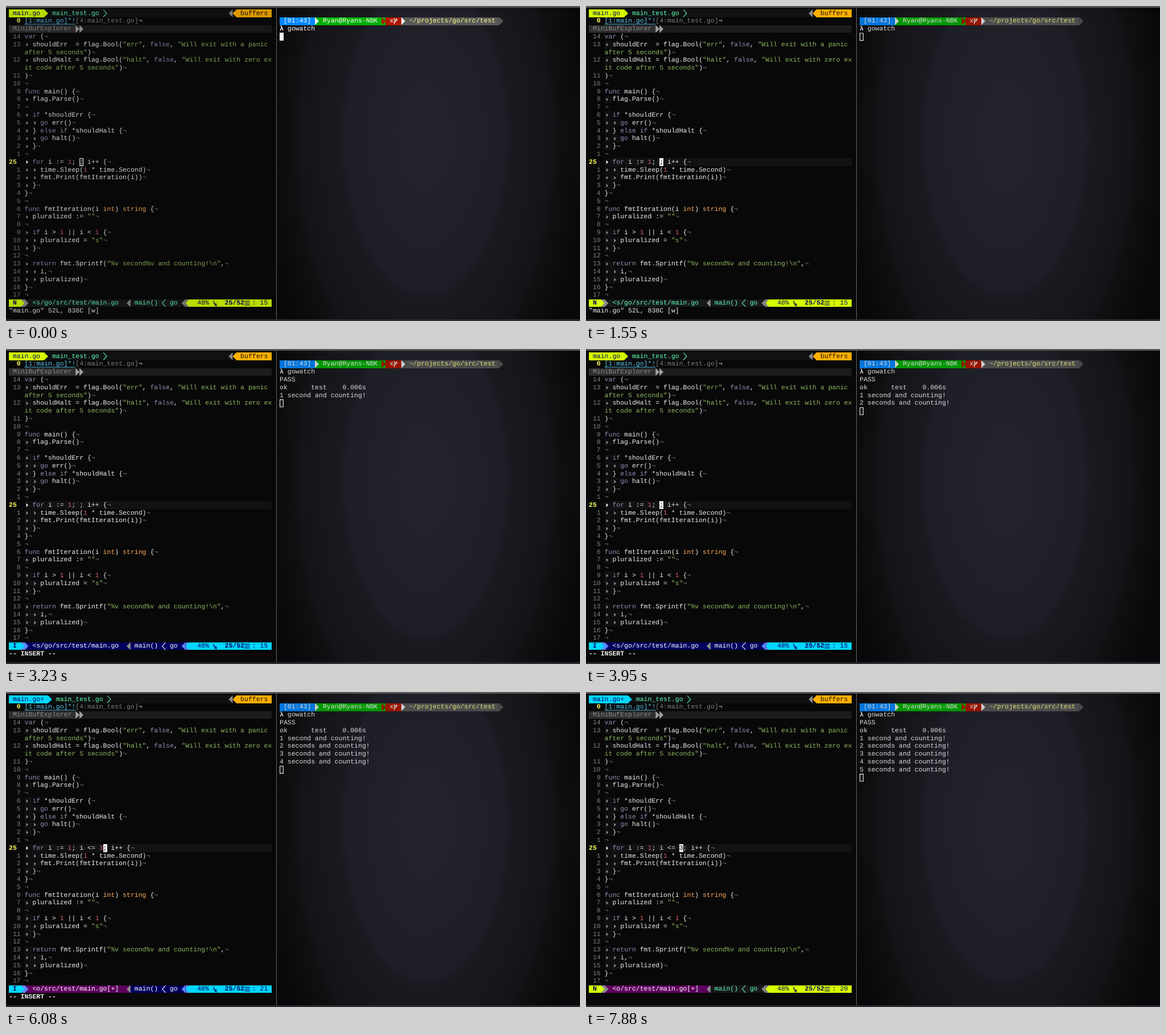
Write an HTML page that moves like this. It is 1009 px wide and 555 px high and loops after 8 s.

```html
<!DOCTYPE html>
<html lang="en">
<head>
<meta charset="utf-8">
<title>Editor and watcher</title>
<style>
html, body { margin: 0; width: 100%; height: 100%; overflow: hidden; background: #080808; }
svg { display: block; width: 100%; height: 100%; }
text {
  font: 11.5px "Liberation Mono", "DejaVu Sans Mono", monospace;
  white-space: pre;
  text-rendering: geometricPrecision;
}
.bold { font-weight: bold; }
.dim { filter: brightness(.86); }
</style>
</head>
<body>
<svg viewBox="0 0 1009 555">
  <defs>
    <radialGradient id="glow" gradientUnits="userSpaceOnUse" cx="0" cy="0" r="1"
        gradientTransform="translate(737 230) scale(290 560)">
      <stop offset="0" stop-color="#24242e"/>
      <stop offset=".48" stop-color="#1e1e27"/>
      <stop offset=".52" stop-color="#191920"/>
      <stop offset=".76" stop-color="#141418"/>
      <stop offset=".81" stop-color="#101012"/>
      <stop offset="1" stop-color="#08080a"/>
    </radialGradient>
  </defs>
  <rect width="1009" height="555" fill="#080808"/>
  <rect x="476" width="533" height="555" fill="url(#glow)"/>
  <rect width="1009" height="3" fill="#555"/>
  <rect x="475" y="3" width="1" height="549" fill="#666"/>
  <rect y="552" width="1009" height="3" fill="#2a2c30"/>
  <g id="editor" transform="translate(5 6)"></g>
  <g id="shell" transform="translate(481 6)"></g>
</svg>
<script>
const CELL = 6.9, ROW = 13.8, COLS = 67, LOOP = 8000;
const editor = document.getElementById('editor');
const shell = document.getElementById('shell');

const color = {
  text: '#eeeeee', keyword: '#8f8fb7', string: '#8fb860', number: '#d75f5f', type: '#ffaf5f',
  faint: '#808080', current: '#ffff5f', aqua: '#5fffaf', bar: '#17191c', gray: '#8a8a8a',
  lime: '#d7ff00', cyan: '#00d7ff', navy: '#00005f', blue: '#5f87ff', purple: '#5f005f', orange: '#ffaf00'
};

// [time, changes that hold from then on]
const timeline = [
  [0, { inEditor: false, lit: true, pass: false, count: 0, insert: false, message: '"main.go" 52L, 838C [w]',
        typed: '', back: 0, tabChanged: false, fileChanged: false }],
  [600, { inEditor: true }],
  [1080, { lit: false }],
  [1550, { lit: true }],
  [2030, { lit: false, pass: true }],
  [2630, { lit: true }],
  [2990, { count: 1 }],
  [3110, { lit: false }],
  [3230, { insert: true, message: '-- INSERT --' }],
  [3350, { lit: true }],
  [3950, { count: 2 }],
  [4190, { typed: 'i', fileChanged: true }],
  [4310, { tabChanged: true }],
  [4420, { typed: 'i ' }],
  [4660, { typed: 'i <' }],
  [5020, { count: 3 }],
  [5260, { lit: false }],
  [5490, { lit: true, typed: 'i <=' }],
  [5850, { typed: 'i <= ' }],
  [5970, { typed: 'i <= 3' }],
  [6080, { count: 4 }],
  [7040, { count: 5 }],
  [7400, { lit: false }],
  [7760, { lit: true, back: 1, message: '' }],
  [7880, { insert: false }]
];

const source = typed => `var (
  shouldErr  = flag.Bool("err", false, "Will exit with a panic after 5 seconds")
  shouldHalt = flag.Bool("halt", false, "Will exit with zero exit code after 5 seconds")
)

func main() {
  flag.Parse()

  if *shouldErr {
    go err()
  } else if *shouldHalt {
    go halt()
  }

  for i := 1; ${typed}; i++ {
    time.Sleep(1 * time.Second)
    fmt.Print(fmtIteration(i))
  }
}

func fmtIteration(i int) string {
  pluralized := ""

  if i > 1 || i < 1 {
    pluralized = "s"
  }

  return fmt.Sprintf("%v second%v and counting!\\n",
    i,
    pluralized)
}
`.split('\n');

const escape = s => s.replace(/&/g, '&amp;').replace(/</g, '&lt;');

const text = (col, row, s, fill, cls = '') =>
  `<text x="${col * CELL}" y="${row * ROW + 9.6}" fill="${fill}" class="${cls}">${escape(s)}</text>`;

const block = (col, row, n, fill) =>
  `<rect x="${col * CELL}" y="${row * ROW}" width="${n * CELL}" height="${ROW}" fill="${fill}" shape-rendering="crispEdges"/>`;

const shape = (col, row, d, attrs) =>
  `<path transform="translate(${col * CELL} ${row * ROW})" d="${d}" ${attrs}/>`;

const line = (col, row, d, stroke) =>
  shape(col, row, d, `fill="none" stroke="${stroke}" stroke-width="1.1"`);

const right = (col, row, fill, back) =>
  (back ? block(col, row, 1, back) : '') + shape(col, row, 'M0 0L6.9 6.9L0 13.8Z', `fill="${fill}"`);

const left = (col, row, fill, back) =>
  (back ? block(col, row, 1, back) : '') + shape(col, row, 'M6.9 0L0 6.9L6.9 13.8Z', `fill="${fill}"`);

function cursor(col, row, filled, char = '') {
  if (filled) return block(col, row, 1, '#f4f4f4') + text(col, row, char, '#101010');
  return line(col, row, 'M.6 .6H6.3V13.2H.6Z', '#f4f4f4');
}

function tokenColor(token) {
  if (token[0] === '"') return color.string;
  if (token === '¬') return color.faint;
  if (/^(var|func|if|else|for|return|go|false)$/.test(token)) return color.keyword;
  if (/^(int|string)$/.test(token)) return color.type;
  return /^\d+$/.test(token) ? color.number : color.text;
}

function codeRows(state) {
  let out = '', row = 3;
  source(state.typed).forEach((raw, i) => {
    const here = i === 14;
    if (here && state.inEditor) out += block(4, row, COLS - 4, '#121213');
    out += here ? text(0, row, '25', color.current, 'bold')
                : text(0, row, String(Math.abs(i - 14)).padStart(3), color.faint);
    let col = 4;
    const indent = raw.match(/^ */)[0].length;
    for (; col < 4 + indent; col += 2) {
      if (state.inEditor) out += block(col, row, 2, '#0f0f11');
      out += shape(col, row, 'M3 3.6L6.6 6.9L3 10.2Z', `fill="${here ? color.text : color.gray}"`);
    }
    const tokens = (raw.slice(indent) + '¬').match(/"[^"]*"|\w+|¬|[^"\w¬]+/g);
    for (const token of tokens) {
      let rest = token;
      while (rest) {
        const part = rest.slice(0, COLS - col);
        out += text(col, row, part, tokenColor(token));
        col += part.length;
        rest = rest.slice(part.length);
        if (col >= COLS) { col = 4; row++; }
      }
    }
    row++;
  });
  return out;
}

function tabRows(state) {
  const name = state.tabChanged ? 'main.go+' : 'main.go';
  const fill = state.tabChanged ? color.cyan : color.lime;
  const end = name.length + 2;
  return block(0, 0, COLS, '#0f1113') + block(0, 0, end, fill) + right(end, 0, fill)
    + text(1, 0, name, color.navy)
    + text(end + 2, 0, 'main_test.go', color.aqua)
    + line(end + 15, 0, 'M.5 .5L6.4 6.9L.5 13.3', color.aqua)
    + left(56, 0, color.gray) + left(57, 0, color.orange)
    + block(58, 0, 9, color.orange) + text(59, 0, 'buffers', '#1c1200')
    + text(2, 1, '0', color.current, 'bold')
    + text(4, 1, '[1:main.go]*!', '#5fc8f0') + line(4, 1, 'M0 12.2H89.7', '#5fc8f0')
    + text(17, 1, '[4:main_test.go]', color.faint) + text(33, 1, '¬', color.text)
    + block(0, 2, COLS, '#1c1c1f') + block(0, 2, 17, '#303030') + text(1, 2, 'MiniBufExplorer', color.gray)
    + right(17, 2, '#a0a0a0') + right(18, 2, '#a0a0a0');
}

function statusRow(state) {
  const row = 37, { insert, fileChanged } = state;
  const main = insert ? color.cyan : color.lime;
  const edge = insert ? color.blue : color.gray;
  const back = insert ? color.navy : color.bar;
  const ink = insert ? '#ffffff' : color.aqua;
  const fileBack = fileChanged ? color.purple : back;
  return block(0, row, COLS, back) + block(4, row, 27, fileBack)
    + block(0, row, 3, main) + text(1, row, insert ? 'I' : 'N', color.navy, 'bold')
    + right(3, row, main, edge) + right(4, row, edge)
    + text(6, row, fileChanged ? '<o/src/test/main.go[+]' : '<s/go/src/test/main.go', fileChanged ? '#ffffff' : ink)
    + left(30, row, color.gray)
    + text(32, row, 'main()', ink) + line(39, row, 'M6.4 .5L.5 6.9L6.4 13.3', ink) + text(41, row, 'go', ink)
    + left(44, row, edge) + left(45, row, main, edge) + block(46, row, 21, main)
    + text(48, row, '48%', color.navy)
    + line(52, row, 'M1.5 2.5V7H3.5M3.5 12V7.5L6 12V7.5', color.navy)
    + text(55, row, '25/52', color.navy, 'bold')
    + line(60, row, 'M.3 3.8H9.6M.3 6.9H9.6M.3 10H9.6', color.navy)
    + text(62, row, ': ' + (15 + state.typed.length - state.back), color.navy);
}

function drawEditor(state) {
  const col = 18 + state.typed.length - state.back;
  const body = tabRows(state) + codeRows(state) + statusRow(state)
    + text(0, 38, state.message, color.text, state.insert ? 'bold' : '');
  const mark = state.lit ? cursor(col, 19, state.inEditor, state.back ? '3' : ';') : '';
  return `<g class="${state.inEditor ? '' : 'dim'}">${body}</g>${mark}`;
}

function drawShell(state) {
  const blue = '#0087ff', green = '#00af00', red = '#b01800', gray = '#585858', pale = '#f0f0f0';
  const lines = [];
  if (state.pass) lines.push('PASS', 'ok      test    0.006s');
  for (let n = 1; n <= state.count; n++) lines.push(`${n} second${n > 1 ? 's' : ''} and counting!`);
  const prompt = block(0, 1, 9, blue) + text(1, 1, '[01:43]', '#fff')
    + right(9, 1, pale, green) + block(10, 1, 16, green) + text(11, 1, 'Ryan@Ryans-NBK', '#fff')
    + right(26, 1, red, green) + block(27, 1, 4, red) + text(28, 1, 'x', '#fff')
    + line(29, 1, 'M1.5 1.5V12.5M1.5 10C1.5 7.5 5 8.5 5 4.5M3 5.5L5 3L7 5.5', '#fff')
    + right(31, 1, pale, gray) + block(32, 1, 24, gray)
    + text(33, 1, '~/projects/go/src/test', '#ffff87') + right(56, 1, gray);
  const output = text(0, 2, 'λ', '#fff', 'bold') + text(2, 2, 'gowatch', '#fff')
    + lines.map((s, i) => text(0, 3 + i, s, '#fff')).join('');
  return `<g class="${state.inEditor ? 'dim' : ''}">${prompt}${output}</g>`
    + cursor(0, 3 + lines.length, !state.inEditor);
}

let shown = -1;
function frame() {
  const t = performance.now() % LOOP;
  const step = timeline.filter(([start]) => start <= t).length;
  if (step !== shown) {
    shown = step;
    const state = Object.assign({}, ...timeline.slice(0, step).map(([, change]) => change));
    editor.innerHTML = drawEditor(state);
    shell.innerHTML = drawShell(state);
  }
  requestAnimationFrame(frame);
}
frame();
</script>
</body>
</html>
```
